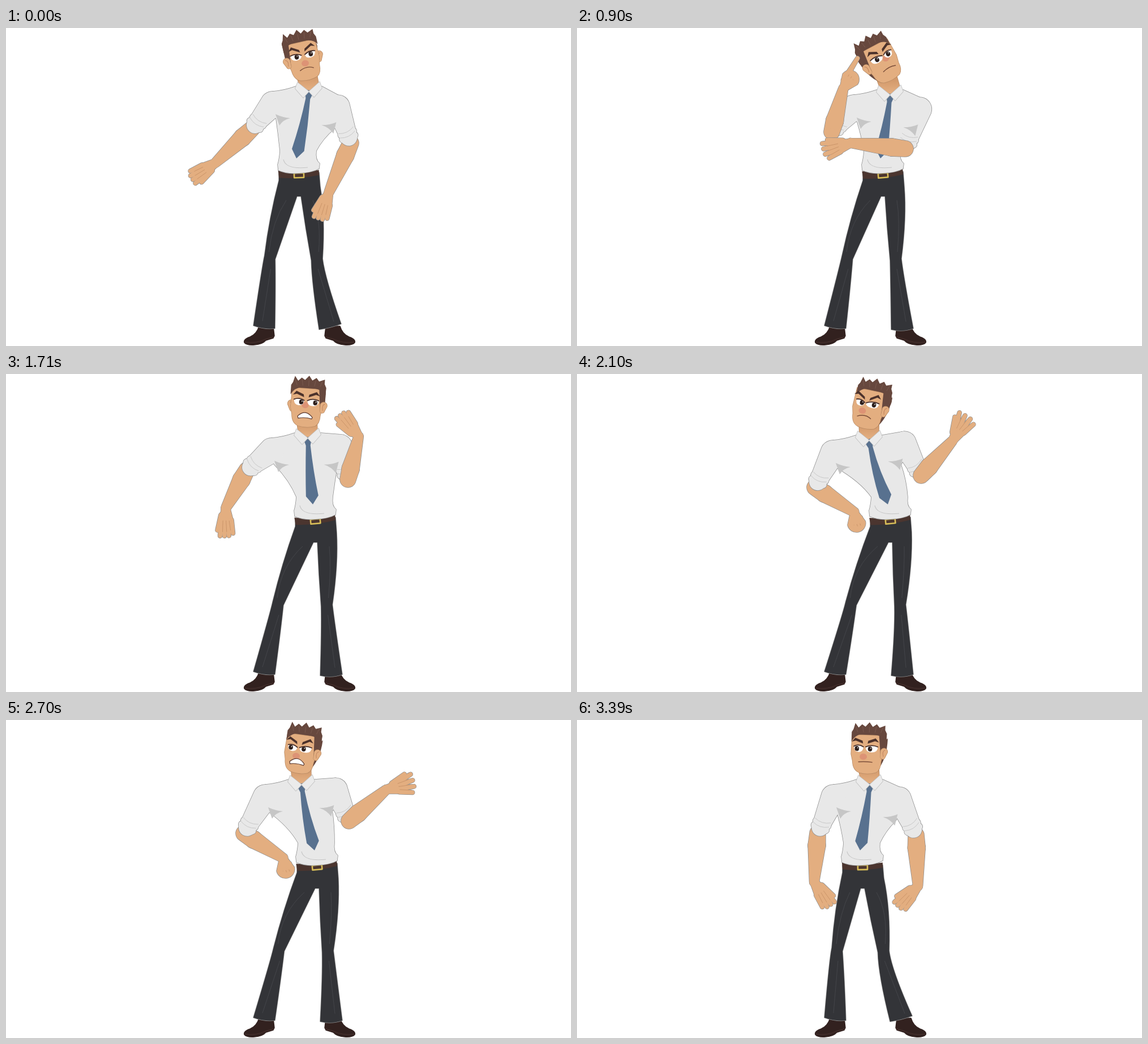
An HTML page with a canvas for the animation above (3510 ms loop, 998 px wide and 561 px high).

```html
<!DOCTYPE html>
<html lang="en">
<head>
<meta charset="utf-8">
<title>Thinking man</title>
<style>
html, body { margin: 0; width: 100%; height: 100%; overflow: hidden; background: #fff; }
canvas { display: block; }
</style>
</head>
<body>
<canvas id="stage" width="998" height="561"></canvas>
<script>
const ctx = document.getElementById('stage').getContext('2d');
const LOOP = 3510, STEP = 30, LAST = 3390;
const SKIN = '#e3ae80', SHIRT = '#e8e8e8', HAIR = '#67483e', CLOTH = '#333438', LINE = '#8c8c8c';

// Hand shapes: thumb side, finger spread, finger length, index length
const grip = (thumb, spread = 5, fingers = 27, index = fingers) => ({ thumb, spread, fingers, index });
const arm = (x, y, reach, angle, hand, shape) => ({ elbow: [x, y], reach, angle, hand, shape });
const onHip = arm(420, 200, 82, 32, 78, grip(-1, 2, 5));

const reaching = {
  neck: [535, 116], hip: 517, tilt: -13, turn: .15, gaze: 1, up: 0, brow: .9, open: 0,
  left: arm(434, 178, 88, 137, 148, grip(-1)),
  right: arm(609, 203, 95, 114, 108, grip(1))
};
const thinking = {
  neck: [553, 122], hip: 540, tilt: -22, turn: 1, gaze: 0, up: 1, brow: .6, open: 0,
  left: arm(450, 183, 79, 285, 306, grip(-1, 3, 5, 36)),
  right: arm(580, 213, 97, 186, 162, grip(1, 9))
};
const protesting = {
  neck: [533, 117], hip: 546, tilt: 4, turn: -.3, gaze: 4, up: 1, brow: .3, open: 1,
  left: arm(425, 170, 76, 119, 88, grip(1)),
  right: arm(604, 186, 78, 284, 233, grip(-1))
};
const refusing = {
  neck: [516, 121], hip: 553, tilt: 12, turn: -1.1, gaze: 3, up: 0, brow: 1, open: 0,
  left: onHip, right: arm(608, 179, 83, 312, 303, grip(-1, 12))
};
const explaining = {
  neck: [522, 118], hip: 549, tilt: 8, turn: -.75, gaze: -3, up: 0, brow: .8, open: 1,
  left: onHip, right: arm(606, 178, 86, 320, 347, grip(-1, 12))
};
const resting = {
  neck: [517, 118], hip: 504, tilt: 2, turn: -.7, gaze: -3, up: 0, brow: .2, open: 0,
  left: arm(425, 200, 86, 94, 58, grip(-1)),
  right: arm(599, 203, 90, 448, 492, grip(1))
};
// swing: extra degrees the arms travel on the way in
const timeline = [
  { from: 0, to: 0, pose: reaching },
  { from: 315, to: 390, pose: thinking },
  { from: 900, to: 1260, pose: { ...thinking, tilt: -28 } },
  { from: 1575, to: 1710, pose: protesting },
  { from: 2040, to: 2100, pose: refusing, swing: [60, 25] },
  { from: 2340, to: 2730, pose: explaining },
  { from: 3150, to: LAST, pose: resting, swing: [40, 0] }
];

function blend(a, b, k) {
  if (typeof a === 'number') return a + (b - a) * k;
  if (Array.isArray(a)) return a.map((v, i) => blend(v, b[i], k));
  return Object.fromEntries(Object.keys(a).map(key => [key, blend(a[key], b[key], k)]));
}
function poseAt(t) {
  const i = timeline.findLastIndex(key => key.from <= t), now = timeline[i], next = timeline[i + 1];
  if (t <= now.to) return now.pose;
  const p = (t - now.to) / (next.from - now.to), pose = blend(now.pose, next.pose, p * p * (3 - 2 * p));
  const arc = Math.sin(Math.PI * p), swing = next.swing || [0, 0];
  [pose.left, pose.right].forEach((a, n) => {
    a.angle += swing[n] * arc;
    a.hand += swing[n] * arc;
    a.reach *= 1 - .15 * arc;
  });
  return pose;
}

const add = (p, x, y) => [p[0] + x, p[1] + y];
const rad = deg => deg * Math.PI / 180;
const heading = (a, b) => Math.atan2(b[1] - a[1], b[0] - a[0]);
function along(p, deg, dist, side = 0) {
  const c = Math.cos(rad(deg)), s = Math.sin(rad(deg));
  return [p[0] + c * dist - s * side, p[1] + s * dist + c * side];
}

// Tapered capsule between two points
function limb(a, b, ra, rb) {
  const p = new Path2D(), q = Math.PI / 2, d = heading(a, b);
  p.arc(...a, ra, d + q, d + 3 * q);
  p.arc(...b, rb, d - q, d + q);
  p.closePath();
  return p;
}
// Fills shapes as one mass with a common outline
function mass(color, shapes, edge = LINE) {
  ctx.strokeStyle = edge;
  ctx.lineWidth = 1.5;
  ctx.lineJoin = 'round';
  shapes.forEach(s => ctx.stroke(s));
  ctx.fillStyle = color;
  shapes.forEach(s => ctx.fill(s));
}
const fill = (color, d) => { ctx.fillStyle = color; ctx.fill(new Path2D(d)); };
function line(color, width, d) {
  ctx.strokeStyle = color;
  ctx.lineWidth = width;
  ctx.stroke(new Path2D(d));
}
function oval(color, x, y, rx, ry) {
  ctx.fillStyle = color;
  ctx.beginPath();
  ctx.ellipse(x, y, rx, ry, 0, 0, 7);
  ctx.fill();
}
function local([x, y], deg, draw, flip = 1) {
  ctx.save();
  ctx.translate(x, y);
  ctx.rotate(rad(deg));
  ctx.scale(flip, 1);
  draw();
  ctx.restore();
}

function shoe() {
  mass('#32211f', [new Path2D('M-72 -18Q-76 -4 -88 1Q-100 5 -98 11Q-94 16 -80 15Q-66 14 -60 7L-47 3L-45 -1L-47 -18Z')], '#32211f');
  line('#513834', .8, 'M-97 10Q-76 13 -61 5L-46 1');
}

function trousers([x, y]) {
  const kl = x * .5 + 208, kr = x * .6 + 239, hx = 456, hy = 529, tilt = (495 - x) / 10;
  const lean = Math.tan(rad(tilt)) * 35, rise = Math.min(8, Math.max(0, 563 - kr));
  const hr = 575 - rise / 4, topL = x - 35, topR = x + 36;
  mass(CLOTH, [new Path2D(`M${topL} ${y - lean - 3}L${topL} ${y + 10}
    Q${topL * .55 + kl * .45 - 10} ${y + 75} ${kl - 10} 402
    Q${kl - 14} 420 ${hx - 19} ${hy - 4}Q${hx} ${hy + 3} ${hx + 19} ${hy + 1}
    Q${kl * .6 + hx * .4 + 14} 455 ${kl + 9} 408L${x - 3} ${y + 38}L${x + 4} ${y + 38}
    Q${(x + kr) / 2 - 4} ${y + 95} ${kr - 10} 410Q${kr - 9} 450 ${hr - 20} 532
    Q${hr} ${537 - rise} ${hr + 19} ${530 - rise}Q${kr + 14} 440 ${kr + 10} 407
    Q${(topR + kr) / 2 + 13} ${y + 75} ${topR + 2} ${y + 20}L${topR} ${y + lean - 3}Z`)]);
  line('#484a4f', .8, `M${x - 22} ${y + 45}Q${kl + 4} 340 ${kl - 2} 395M${kl + 1} 425L${hx - 3} ${hy - 12}
    M${x + 25} ${y + 45}Q${kr + 8} 340 ${kr + 3} 395M${kr + 2} 425L${hr + 6} 518`);
  local([x, y], tilt, () => {
    fill('#4b352f', 'M-36 -9Q0 -2 36 -7L36 2Q0 8 -35 4Z');
    line('#d8be58', 2.6, 'M-8 -3L9 -3L9 5L-8 5Z');
  });
}

function torso(neck, [x, y], sl, sr) {
  const al = add(sl, 6, 26), ar = add(sr, -6, 38);
  const body = new Path2D(`M${add(neck, -23, -13)}Q${add(sl, 18, -23)} ${add(sl, 0, -22)}L${add(sl, -10, 5)}L${al}
    Q${x * .7 - 24 + al[0] * .3} ${(al[1] + y - 45) / 2} ${x - 33} ${y - 42}
    Q${x - 34} ${y - 28} ${x - 37} ${y - 18}L${x - 36} ${y - 8}Q${x - 20} ${y - 1} ${x} ${y - 3}
    Q${x + 24} ${y - 4} ${x + 36} ${y - 11}L${x + 37} ${y - 20}Q${x + 29} ${y - 26} ${x + 31} ${y - 42}
    Q${x * .7 + 23 + ar[0] * .3} ${(ar[1] + y - 45) / 2} ${ar}L${add(sr, 10, 5)}L${add(sr, 0, -21)}
    L${add(neck, 23, -13)}L${neck}Z`);
  const folds = () => {
    local(al, 0, () => fill('#c6c6c6', 'M-1 -8Q12 -2 25 -1Q12 2 6 12Z'));
    local(ar, 0, () => fill('#c6c6c6', 'M-23 -6Q-8 -6 3 -11L-2 9Q-10 -2 -23 -6Z'));
    local([x, y], 0, () => line('#c4c4c4', 1.1, 'M-27 -27Q-23 -9 16 -13'));
  };
  return { body, folds };
}

function sleeve(shoulder, radius, elbow) {
  const end = blend(shoulder, elbow, .84), dir = heading(shoulder, elbow) * 180 / Math.PI;
  const band = d => limb(along(end, dir, d, 11), along(end, dir, d, -11), 6, 6);
  const folds = () => {
    for (const d of [-12, -4]) {
      line('#c9c9c9', 1, `M${along(end, dir, d, 15)}Q${along(end, dir, d + 6)} ${along(end, dir, d - 3, -14)}`);
    }
  };
  return { shapes: [limb(shoulder, end, radius, 15), band(-8), band(0)], folds };
}

function tie(neck, hip) {
  const tip = add(hip, -4, -29), len = Math.hypot(tip[0] - neck[0], tip[1] - neck[1]);
  const bow = (neck[0] - hip[0]) * .12;
  local(neck, heading(neck, tip) * 180 / Math.PI - 90, () => fill('#58718f',
    `M-4 -6L4 -6L6 2L4 9Q${7 + bow} 55 11 ${len - 15}L0 ${len}L-11 ${len - 15}Q${bow - 7} 55 -4 9L-6 2Z`));
}

function collar() {
  mass('#ebebeb', [new Path2D('M-20 -20L-24 -9L-10 7L0 -4Z'), new Path2D('M19 -21L23 -10L9 6L0 -4Z')], '#bdbdbd');
}

function eye(side, { turn, gaze, brow }) {
  const x = side * (13 - 2 * Math.abs(turn)), rx = 9.5 - side * turn * 1.7;
  const outer = x + side * rx, inner = x - side * rx, low = 3 * brow - 4;
  ctx.save();
  const white = new Path2D(`M${outer} -4Q${x} ${-9 + 2 * brow} ${inner} ${low}Q${inner} 6 ${x} 6Q${outer} 6 ${outer} -4`);
  ctx.clip(white);
  oval('#fff', x, 0, 14, 12);
  oval('#2f211e', x + gaze, 0, 3.8, 4.3);
  oval('#fff', x + gaze + 1.3, -1.5, .9, .9);
  ctx.restore();
  line('#4a302a', 1.8, `M${outer} -4Q${x} ${-9 + 2 * brow} ${inner} ${low}`);
  fill('#4c322b', `M${side * 4} ${4 * brow - 10}L${side * 5} ${4 * brow - 15}L${side * 18} -19L${side * 24} -12
    L${side * 17} -14Z`);
}

function head(center, pose) {
  const { tilt, turn, up, brow, open } = pose;
  local(center, tilt, () => {
    const f = 4 * turn, near = turn < 0 ? 1 : -1, side = Math.abs(turn);
    const ear = s => {
      const x = s * (30 - 4 * side);
      mass(SKIN, [limb([x, 4], [x - s * 2, 13], 6, 4)], '#b78962');
      line('#c58a63', 1.2, `M${x + s * 2} 1Q${x - s * 4} 3 ${x - s} 13`);
    };
    if (side > .4) fill(HAIR, `M${near * 33} -20Q${near * 33} 18 ${near * 15} 39L${near * 8} 8Z`);
    oval(HAIR, -3 * turn, -12, 30, 24);
    if (side < .5) ear(-near);
    mass(SKIN, [new Path2D(`M${f - 27} -24L${f - 28} 10L${f - 25} 22Q${f - 24} 38 ${f - 13} 42
      Q${f + 2} 46 ${f + 17} 41Q${f + 25} 36 ${f + 25} 22L${f + 28} 8L${f + 27} -24Z`)], '#b78962');
    fill(HAIR, `M${near * 31} -28L${near * (20 - 4 * side)} -27L${near * (24 - 4 * side)} 11
      L${near * (28 - 4 * side)} 11L${near * 31} -2Z`);
    ear(near);
    fill(HAIR, `M-31 -12L-31 -29L-28 -34L-25 -45L-19 -37L-13 -43L-7 -39L0 -47L6 -39L13 -44L18 -38L28 -42
      L28 -34L31 -28L31 -14Q24 -27 ${f} -25Q-22 -29 -31 -12Z`);
    for (let x = -24; x <= 24; x += 12) line('#7b5b50', .9, `M${x} -39L${x * .85} -29`);
    oval('#dd9375', 13 * turn, 14 - 9 * up, 6.5, 5.5);
    ctx.translate(9 * turn, 0);
    ctx.lineCap = 'round';
    eye(-1, pose);
    eye(1, pose);
    if (open > .1) {
      const h = 8 * open;
      const d = `M-13 25Q0 ${24 - h * 1.6} 13 26L12 ${26 + h * .35}Q0 ${25 + h * .1} -12 ${25 + h * .5}Z`;
      fill('#fff', d);
      line('#5c3a30', 1.2, d);
    } else line('#7a4d39', 1.4, `M-11 ${23 + 2 * brow}Q2 ${23 - 5 * brow} 13 ${23 + 2 * brow}`);
  });
}

function hand(wrist, deg, { thumb, spread, fingers, index }) {
  const side = thumb < 0 ? -1 : 1, fist = 1 - Math.min(1, fingers / 27);
  const shapes = [limb(along(wrist, deg, 2), along(wrist, deg, 20), 8, 12 + 5 * fist)];
  const gaps = [];
  for (let i = 0; i < 4; i++) {
    const off = (1.5 - i) * side, dir = deg + off * spread;
    const base = along(wrist, deg, 22, off * 5.5), len = (i ? fingers : index) - (i === 3 ? 4 : 0);
    shapes.push(limb(base, along(base, dir, len), 5, 3.6));
    if (i) gaps.push([along(base, dir, 0, 3 * side), along(base, dir, len * .75, 3.5 * side)]);
  }
  const root = along(wrist, deg, 13, 7 * thumb);
  shapes.push(limb(root, along(root, deg + thumb * (14 + spread * 1.1), 27 * (1 - fist)), 6, 3.6));
  mass(SKIN, shapes);
  gaps.forEach(([a, b]) => line('#c58f64', .8, `M${a}L${b}`));
}

function forearm({ elbow, reach, angle, hand: deg, shape }) {
  const wrist = along(elbow, angle, reach), belly = along(elbow, angle, reach * .25);
  hand(wrist, deg, shape);
  mass(SKIN, [limb(elbow, belly, 14, 15.5), limb(belly, wrist, 15.5, 8.5)]);
  ctx.fillStyle = SKIN;
  ctx.fill(limb(wrist, along(wrist, deg, 8), 8.3, 8.5));
}

function draw(t) {
  const pose = poseAt(t), { neck, left, right } = pose;
  const hip = [pose.hip, 259], lean = neck[0] - hip[0];
  const sl = add(neck, -64, 18), sr = add(neck, 55 - lean * .2, 16 + lean * .4);
  const center = add(neck, pose.tilt * .65 - 3, -67);
  const arms = [left, right], raised = a => Math.sin(rad(a.angle)) < 0;
  ctx.clearRect(0, 0, 998, 561);
  local([519, 544], 0, shoe);
  local([518, 544], 0, shoe, -1);
  trousers(hip);

  const shade = ctx.createLinearGradient(0, neck[1] - 30, 0, neck[1] - 8);
  shade.addColorStop(0, '#d39a6c');
  shade.addColorStop(1, SKIN);
  mass(shade, [limb(along(center, pose.tilt + 90, 26), add(neck, 0, -17), 18, 17)], '#b78962');
  fill(shade, `M${add(neck, -18, -18)}L${add(neck, 18, -18)}L${neck}Z`);

  arms.filter(a => !raised(a)).forEach(forearm);
  const shirt = torso(neck, hip, sl, sr);
  const sleeves = [sleeve(sl, 22, left.elbow), sleeve(sr, 21, right.elbow)];
  mass(SHIRT, [shirt.body, ...sleeves.flatMap(s => s.shapes)]);
  [shirt, ...sleeves].forEach(part => part.folds());
  tie(neck, hip);
  local(neck, 0, collar);
  head(center, pose);
  arms.filter(raised).forEach(forearm);
}

function frame(now) {
  draw(Math.min(Math.floor(now % LOOP / STEP) * STEP, LAST));
  requestAnimationFrame(frame);
}
requestAnimationFrame(frame);
</script>
</body>
</html>
```
